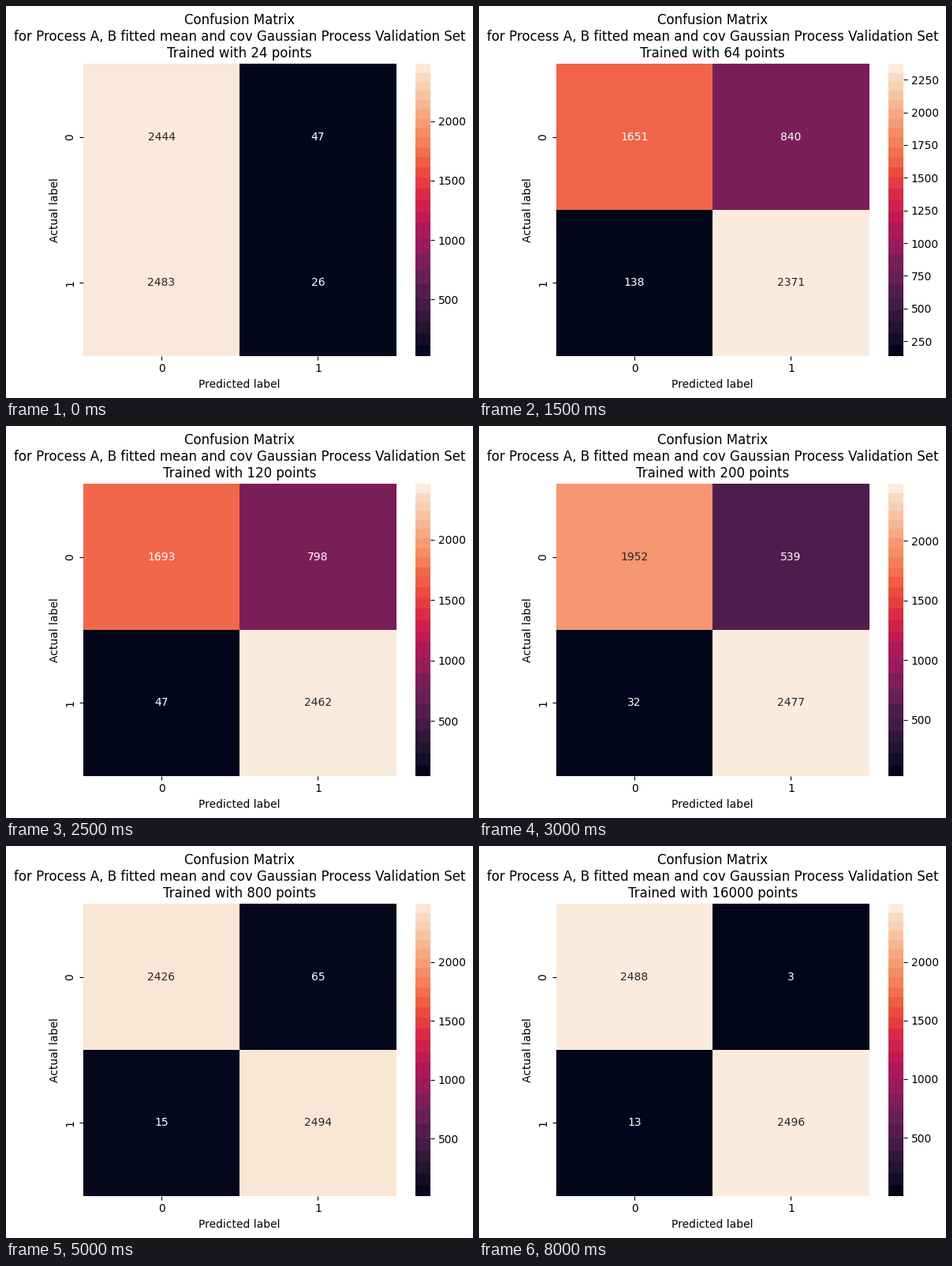
Recreate the animation shown at these times as a matplotlib script. Size 592 by 496 pixels, loop 8.5 s.

```python
import matplotlib.pyplot as plt
import numpy as np
from matplotlib.animation import FuncAnimation
from matplotlib.colors import LinearSegmentedColormap

W, H, DPI = 592, 496, 100
MARGIN = 10
NEG, POS = 2491, 2509          # row totals of the matrix
LAST = 15
BANDS = 26

# step: (training points, true negatives, false negatives)
KEYS = {0: (24, 2444, 2483), 1: (40, 2189, 1438), 2: (64, 1651, 138),
        4: (120, 1693, 47), 6: (320, 2250, 22), 7: (400, 2416, 20),
        9: (800, 2426, 15), 13: (4800, 2488, 14), LAST: (16000, 2488, 13)}

cmap = LinearSegmentedColormap.from_list("heat", [
    "#03051a", "#221331", "#451c47", "#691f55", "#921c5b", "#b91657",
    "#d92847", "#ed503e", "#f47d57", "#f6a47c", "#f7c9aa", "#faebdd"])

# Split the bar into bands of equal length along the colour path
grid = np.linspace(0, 1, 257)
jumps = np.abs(np.diff(cmap(grid), axis=0)).sum(axis=1)
path = np.concatenate([[0], np.cumsum(jumps)])
edges = np.interp(np.linspace(0, path[-1], BANDS + 1), path, grid)
mids = (edges[:-1] + edges[1:]) / 2

fig = plt.figure(figsize=(W / DPI, H / DPI), dpi=DPI, facecolor="white")


def place(axes, x, w, dx=0, dy=0):
    axes.set_position([(x + dx) / W, (52.8 + dy) / H, w / W, 369.6 / H])


def add_axes():
    axes = fig.add_axes([0, 0, 1, 1])
    axes.spines[:].set_visible(False)
    axes.patch.set_visible(False)
    return axes


ax = add_axes()
heat = ax.pcolormesh(np.zeros((2, 2, 4)))
ax.set(xlim=(0, 2), ylim=(2, 0), xlabel="Predicted label",
       ylabel="Actual label")
ax.set_xticks([0.5, 1.5], ["0", "1"])
ax.set_yticks([0.5, 1.5], ["0", "1"], rotation="vertical", va="center")
notes = [ax.text(x + 0.5, y + 0.5, "", ha="center", va="center")
         for y in range(2) for x in range(2)]
title = ax.set_title("")

bar = add_axes()
scale = bar.pcolormesh([0, 1], edges, np.zeros((BANDS, 1, 4)),
                       transform=bar.transAxes)
bar.set_xlim(0, 1)
bar.set_xticks([])
bar.yaxis.tick_right()


def state(step):
    """Geometric steps between the keys; points to two digits."""
    logs = np.log(list(KEYS.values())).T
    points, tn, fn = (np.exp(np.interp(step, list(KEYS), v)) for v in logs)
    return int(float(f"{points:.1e}")) if step not in KEYS else KEYS[step][0], \
        round(tn), round(fn)


def draw(frame):
    points, tn, fn = state(max(frame - 1, 0))   # the first step holds twice
    counts = np.array([tn, NEG - tn, fn, POS - fn])
    low, high = counts.min(), counts.max()
    level = (counts - low) / (high - low)
    slot = np.searchsorted(edges[1:-1], level, side="right")

    # A band that holds cells takes their mean colour
    colors = cmap(mids)
    for s in set(slot):
        colors[s] = cmap(level[slot == s]).mean(axis=0)

    scale.set_array(colors[:, None])
    heat.set_array(colors[slot].reshape(2, 2, 4))
    for note, count, lv in zip(notes, counts, level):
        note.set_text(str(count))
        note.set_color(".15" if lv > 0.76 else "w")
    bar.set_ylim(low, high)
    title.set_text("Confusion Matrix\n"
                   "for Process A, B fitted mean and cov "
                   "Gaussian Process Validation Set\n"
                   f"Trained with {points} points")
    return []


def layout(dx=0, dy=0):
    place(ax, 80, 396.8, dx, dy)
    place(bar, 501.6, 18.48, dx, dy)


# Shift the plot so that its tight box starts at the margin
layout()
draw(0)
box = fig.get_tightbbox()
layout(MARGIN - box.x0 * DPI, MARGIN - box.y0 * DPI)

anim = FuncAnimation(fig, draw, frames=LAST + 2, interval=500,
                     init_func=lambda: draw(0), repeat=True, repeat_delay=0)
plt.show()
```
